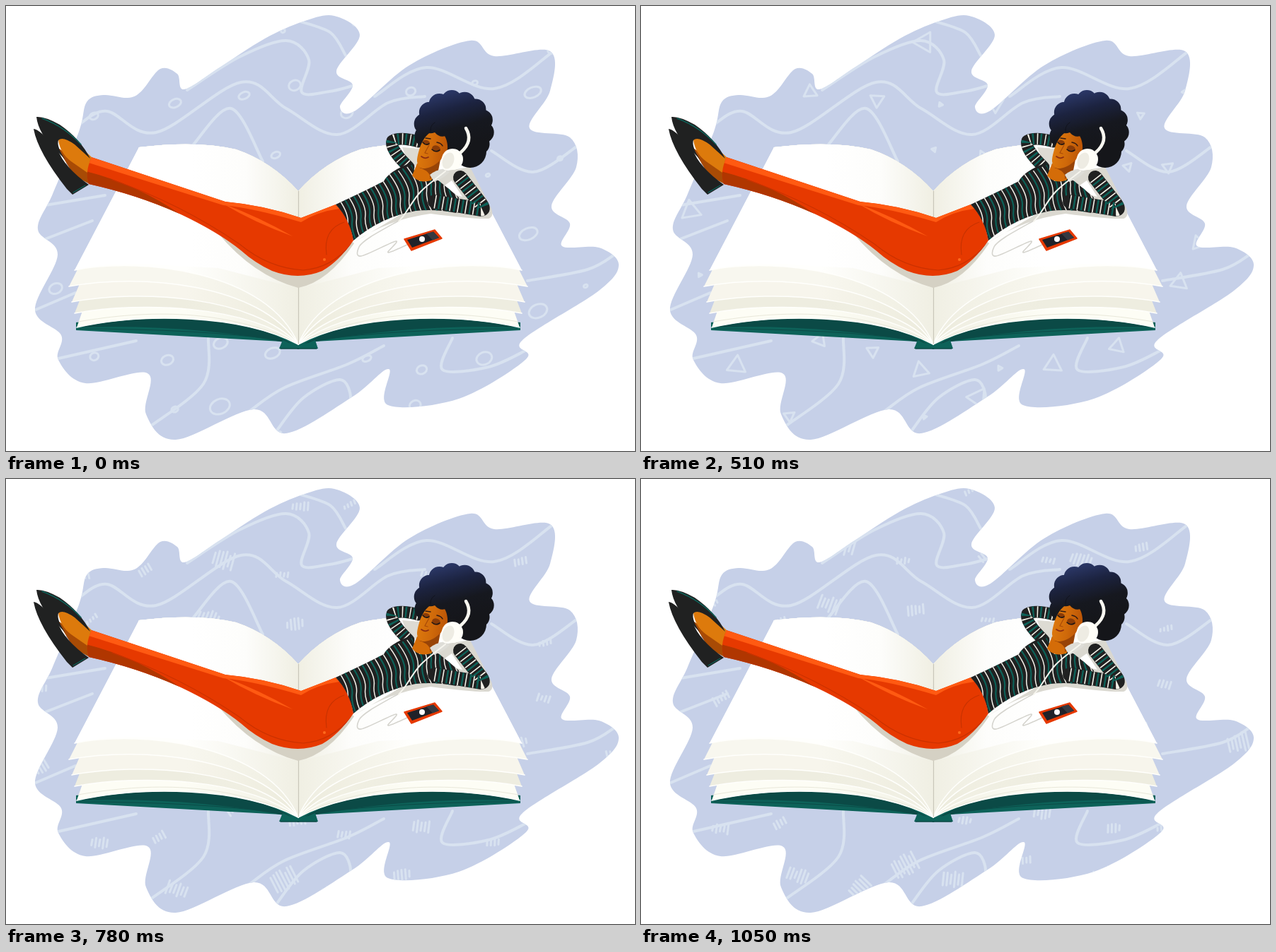
Write an HTML page with a canvas that moves like this. It is 889 px wide and 630 px high and loops after 1080 ms.

```html
<!DOCTYPE html>
<html lang="en">
<head>
<meta charset="utf-8">
<title>Resting on a book</title>
<style>
html,body{margin:0;height:100%;overflow:hidden;background:#fff}
canvas{display:block}
</style>
</head>
<body>
<canvas width="889" height="630"></canvas>
<script>
const ctx = document.querySelector('canvas').getContext('2d');
const PHASE = 360, STEP = 30;
const INK = '#202121', TEAL = '#0d6259', DEEP = '#0b4a46', RED = '#e63900', PALE = '#d8e2f0';

const rand = n => {
  const v = Math.sin(n * 127.1) * 43758.5;
  return v - Math.floor(v);
};

// Smooth curve through key points (Catmull-Rom).
function spline(text, closed) {
  const v = text.trim().split(/\s+/).map(Number), n = v.length / 2, p = new Path2D();
  const at = i => {
    const k = closed ? (i + n) % n : Math.max(0, Math.min(n - 1, i));
    return [v[2 * k], v[2 * k + 1]];
  };
  p.moveTo(...at(0));
  for (let i = 0; i < (closed ? n : n - 1); i++) {
    const [a, b, c, d] = [at(i - 1), at(i), at(i + 1), at(i + 2)];
    p.bezierCurveTo(b[0] + (c[0] - a[0]) / 6, b[1] + (c[1] - a[1]) / 6,
      c[0] - (d[0] - b[0]) / 6, c[1] - (d[1] - b[1]) / 6, ...c);
  }
  return p;
}
const toPath = p => typeof p == 'string' ? new Path2D(p) : p;
function fill(p, color) {
  ctx.fillStyle = color;
  ctx.fill(toPath(p));
}
function line(p, color, width) {
  ctx.strokeStyle = color;
  ctx.lineWidth = width;
  ctx.stroke(toPath(p));
}
function grad(x0, y0, x1, y1, ...stops) {
  const g = ctx.createLinearGradient(x0, y0, x1, y1);
  stops.forEach((c, i) => g.addColorStop(i / (stops.length - 1), c));
  return g;
}
function ellipse(x, y, rx, ry, tilt = 0) {
  const p = new Path2D();
  p.ellipse(x, y, rx, ry, tilt, 0, 7);
  return p;
}
function clipped(p, draw) {
  ctx.save();
  ctx.clip(p);
  draw();
  ctx.restore();
}

const blob = spline(`103 178 114 136 138 126 172 130 191 121 218 89 242 96 252 118 302 87
  366 46 420 22 464 14 500 41 467 92 490 112 472 143 494 148 570 84 656 49 690 71 769 64
  769 120 740 173 797 186 806 228 771 283 797 308 786 340 838 342 866 366 838 403 730 473
  735 500 640 556 540 565 541 514 490 553 396 605 350 571 240 614 198 578 200 520 112 534
  74 501 78 466 41 430 73 352 45 316 66 266`, true);

// Contour lines, given by their crests and troughs.
const waves = ['104 167 143 149 212 179 332 108 396 145 468 182 540 137 592 128',
  '256 119 330 72 396 49 428 76 418 122 457 121 490 113', '416 22 459 38 480 70',
  '264 197 318 145 363 220', '45 334 122 304', '56 282 140 268', '42 430 98 406',
  '74 499 184 474', '286 470 279 535 204 595', '345 573 394 540 483 507 534 481',
  '382 602 420 555 472 529 487 557 469 575', '631 470 617 515 682 511 736 487',
  '737 389 822 373 863 350', '521 128 594 87 690 117 774 64', '686 205 745 235 808 198'
].map(s => spline(s));

function ring(x, y, size, turn) {
  line(ellipse(x, y, size * .7, size * (.4 + .2 * turn), -.4), PALE, 3);
}
function triangle(x, y, size, turn) {
  const corner = k => {
    const a = (turn + k / 3) * 2 * Math.PI;
    return [x + size * .8 * Math.cos(a), y + size * .8 * Math.sin(a)];
  };
  line(`M${corner(0)}L${corner(1)}L${corner(2)}Z`, PALE, 3);
}
function hatch(x, y, size, turn) {
  ctx.save();
  ctx.translate(x, y);
  ctx.rotate(.7 + turn * 1.2);
  const n = Math.round(3 + size / 6);
  for (let k = 0; k < n; k++) {
    const half = size * (.3 + .4 * rand(k + x)), off = (k - (n - 1) / 2) * 5.4;
    line(`M${-half} ${off}L${half} ${off + 1}`, PALE, 3);
  }
  ctx.restore();
}
// Each kind of mark drifts steadily (px per ms), then gives way to the next.
const phases = [
  { mark: ring, vx: .0714, vy: -.0465 },
  { mark: triangle, vx: .081, vy: -.037 },
  { mark: hatch, vx: -.074, vy: -.074 }
];
function drawMarks(t) {
  const kind = Math.floor(t / PHASE), age = t % PHASE, { mark, vx, vy } = phases[kind];
  for (let i = 0; i < 70; i++) {
    const r = k => rand(i * 5 + k + kind * 400);
    const x = (i % 10 + .2 + .6 * r(1)) * 89, y = (Math.floor(i / 10) + .2 + .6 * r(2)) * 90;
    mark(x + vx * age, y + vy * age, 4 + 18 * r(3) ** 1.5, r(4));
  }
}
function drawGround(t) {
  fill(blob, '#c6d0e8');
  clipped(blob, () => {
    waves.forEach(w => line(w, PALE, 4));
    drawMarks(t);
  });
}

function drawHalf() {
  fill('M99 448L99 459L390 475L413 486V468C320 425 190 433 99 448Z', TEAL);
  fill('M106 455C190 430 320 430 404 478Q260 450 106 455Z', DEEP);
  line('M104 457Q270 457 390 473', DEEP, 1);
  // Leaves fan out from the spine, the lowest first.
  const leaf = (x, y, rise, left, mid) => {
    const edge = `${x} ${y}C190 ${y - rise} ${330 + (455 - y) / 2} ${y - rise + (455 - y) * .25} 413 479`;
    fill(`M188 200L${edge}V262Q375 220 325 203Q270 190 188 200Z`,
      grad(95, 0, 413, 0, left, left, mid));
    line('M' + edge, '#fffffc', 1.5);
  };
  leaf(100, 455, 20, '#fdfdf5', '#f1f0e4');
  line('M102 447C200 430 310 428 412 477', '#e9e8da', 1);
  leaf(97, 435, 17, '#eeede0', '#f2f1e5');
  leaf(93, 419, 18, '#f7f5ec', '#ecebdc');
  leaf(89, 397, 19, '#f8f7ef', '#efeee1');
  leaf(97, 374, 19, '#fffffd', '#f0efe3');
  fill('M188 200L97 374Q150 360 240 368L300 371L413 400V262Q375 220 325 203Q270 190 188 200Z',
    grad(188, 0, 413, 0, '#fff', '#fff', '#fdfdfb', '#f0efe3'));
}
function drawBook() {
  drawHalf();
  ctx.save();
  ctx.transform(-1, 0, 0, 1, 826, 0);
  drawHalf();
  ctx.restore();
  fill('M391 473L386 485H441L437 473L425 478Q413 482 402 478Z', TEAL);
  line('M388 485H439', DEEP, 1.5);
  line('M413.5 262V478', '#c9c7ba', 1.2);
}

function drawLegs() {
  fill('M300 322Q350 382 413 399Q455 391 492 336L460 310Z', '#d5d1c4');
  // Feet and shoes
  fill('M72 200L95 215L116 234L118 252L96 240Z', '#a84b05');
  fill('M74 189Q83 183 97 192L121 214L115 236L92 220Q76 208 74 189Z', '#dd7a0c');
  fill('M43 157Q55 156 76 168Q105 188 119 216L97 196Q80 184 74 190Q71 199 84 218L72 205Q46 182 43 157Z', INK);
  line('M51 159Q83 171 106 196', TEAL, 1.4);
  fill('M39 174Q47 174 73 203Q82 228 117 253L94 267L86 259Q45 207 39 174Z', INK);
  line('M95 264L112 254', TEAL, 1.3);
  // Trousers
  const legs = toPath('M121 214L310 277Q365 282 417 300L466 281Q486 300 491 332Q470 362 447 375Q413 389 376 375Q352 364 332 346Q300 320 245 294Q185 267 117 252Q111 236 121 214Z');
  fill(legs, RED);
  clipped(legs, () => {
    fill('M113 234Q185 252 248 296L200 290L110 254Z', '#b03600');
    fill('M121 214L310 277Q365 281 417 298L417 306Q350 286 307 282Q205 250 117 222Z', '#ff5a12');
    fill('M417 299L466 280L471 287Q440 291 417 306Z', '#ff5a12');
    fill('M307 280Q356 298 405 326Q350 306 307 280Z', '#ff5a12');
    line('M150 246Q247 280 330 337Q371 371 420 374Q460 371 488 337', '#ca3100', 1.2);
    line('M478 306Q448 316 453 352', '#c83200', 1.2);
    fill(ellipse(450, 359, 2, 2), '#ff6a1c');
  });
}

function sleeve(d, width) {
  line(d, INK, width);
  ctx.lineCap = 'butt';
  [['#f4f2e9', 1.6, 0], [TEAL, 2.4, 5.5]].forEach(([color, dash, offset]) => {
    ctx.setLineDash([dash, 11 - dash]);
    ctx.lineDashOffset = offset;
    line(d, color, width - 1);
  });
  ctx.setLineDash([]);
  ctx.lineCap = 'round';
}
function drawTorso() {
  fill('M491 335Q540 302 600 294Q660 302 682 301Q690 298 686 287L656 228L618 234L600 270Z', '#dad8d0');
  fill('M560 200L584 202L582 226L570 226Z', '#dddbd3');
  fill('M610 261L630 247L645 270Z', '#fff');
  sleeve('M583 192Q556 185 546 191Q542 202 569 228', 17);
  const shirt = toPath('M466 281Q505 263 534 248Q541 234 572 222L584 248L606 243L626 259L640 271L636 293Q607 287 579 290Q529 299 491 332Q486 302 466 281Z');
  fill(shirt, INK);
  clipped(shirt, () => {
    for (let i = 0; i < 28; i++) {
      const x = 468 + i * 6.2, y = 270 - i * 2.6;
      line(`M${x} ${y}q17 23 15 38t12 38`, i % 2 ? TEAL : '#f1f0e9', i % 2 ? 2.2 : 1.5);
    }
  });
  sleeve('M606 277L671 288Q677 288 670 279L642 243', 20);
}

// Curls sit along an ellipse, from the left temple over the top to the nape.
const hair = ellipse(636, 173, 44, 44);
for (let a = -3.4; a < 1.1; a += .44) {
  hair.addPath(ellipse(633 + 42 * Math.cos(a), 174 + 40 * Math.sin(a), 15, 15));
}
hair.addPath(ellipse(656, 206, 23, 23));
const face = spline('597 181 588 193 583 207 581 220 585 228 592 230 604 226 616 216 624 202 620 184 608 177', true);

function drawHead() {
  const tone = grad(620, 118, 642, 200, '#2d3a6c', '#1c2340', '#16181f', '#15161a');
  fill(hair, tone);
  fill('M581 223L574 240Q583 252 601 247L611 229L610 216Z', '#d46c08');
  fill('M584 229Q602 229 615 212L611 233L599 245Q601 234 584 229Z', '#984407');
  fill(face, grad(584, 200, 624, 207, '#dc780c', '#cf690a', '#b95306'));
  fill('M585 170Q594 184 606 179Q613 187 621 184Q628 192 626 205L646 207L645 164L592 160Z', tone);
  line('M600 178Q599 169 606 165', '#10131d', 1);
  fill(ellipse(594, 193, 5, 3, .25), '#8a3c08');
  fill(ellipse(608, 202, 6, 4.5, .3), '#8a3c08');
  line('M589 193Q593 198 598 195M602 203Q607 208 613 204', '#201714', 1.6);
  line('M593 187L600 188M609 193Q615 194 617 198', '#311b14', 1.5);
  line('M598 197Q594 204 592 208L596 209', '#a74a08', 1.2);
  line('M587 213Q592 217 597 214', '#8c2d12', 1.7);
  // Headphones
  fill('M599 239Q607 232 621 230L627 235Q620 243 605 249Z', '#deddd7');
  line('M643 207Q661 191 650 173', '#f8f7f0', 4.5);
  fill(ellipse(631, 217, 15, 15, -.5), '#fffef8');
  fill(ellipse(625, 219, 9, 13, .35), '#eeece3');
  line(ellipse(625, 219, 9, 13, .35), '#fffef9', 2);
}
function drawPhone() {
  line(spline('555 304 515 327 499 341 502 354 551 333 540 349 567 338'), '#d5d4ce', 1.6);
  line(spline('621 234 586 263 564 294 555 305'), '#f6f5ee', 2);
  const body = 'M563 330L606 317L616 329L573 346Z';
  fill(body, RED);
  line(body, RED, 1.5);
  fill('M567 331L604 319.5L612 328L574 342Z', '#202229');
  fill('M594 322L604 319.5L612 328L603 331.5Z', '#363941');
  fill(ellipse(588, 330, 4, 4), '#fff');
}

function frame() {
  const loop = PHASE * phases.length;
  const t = Math.floor(performance.now() % loop / STEP) * STEP;
  ctx.clearRect(0, 0, 889, 630);
  ctx.lineCap = ctx.lineJoin = 'round';
  drawGround(t);
  drawBook();
  drawLegs();
  drawTorso();
  drawHead();
  drawPhone();
  requestAnimationFrame(frame);
}
frame();
</script>
</body>
</html>
```
